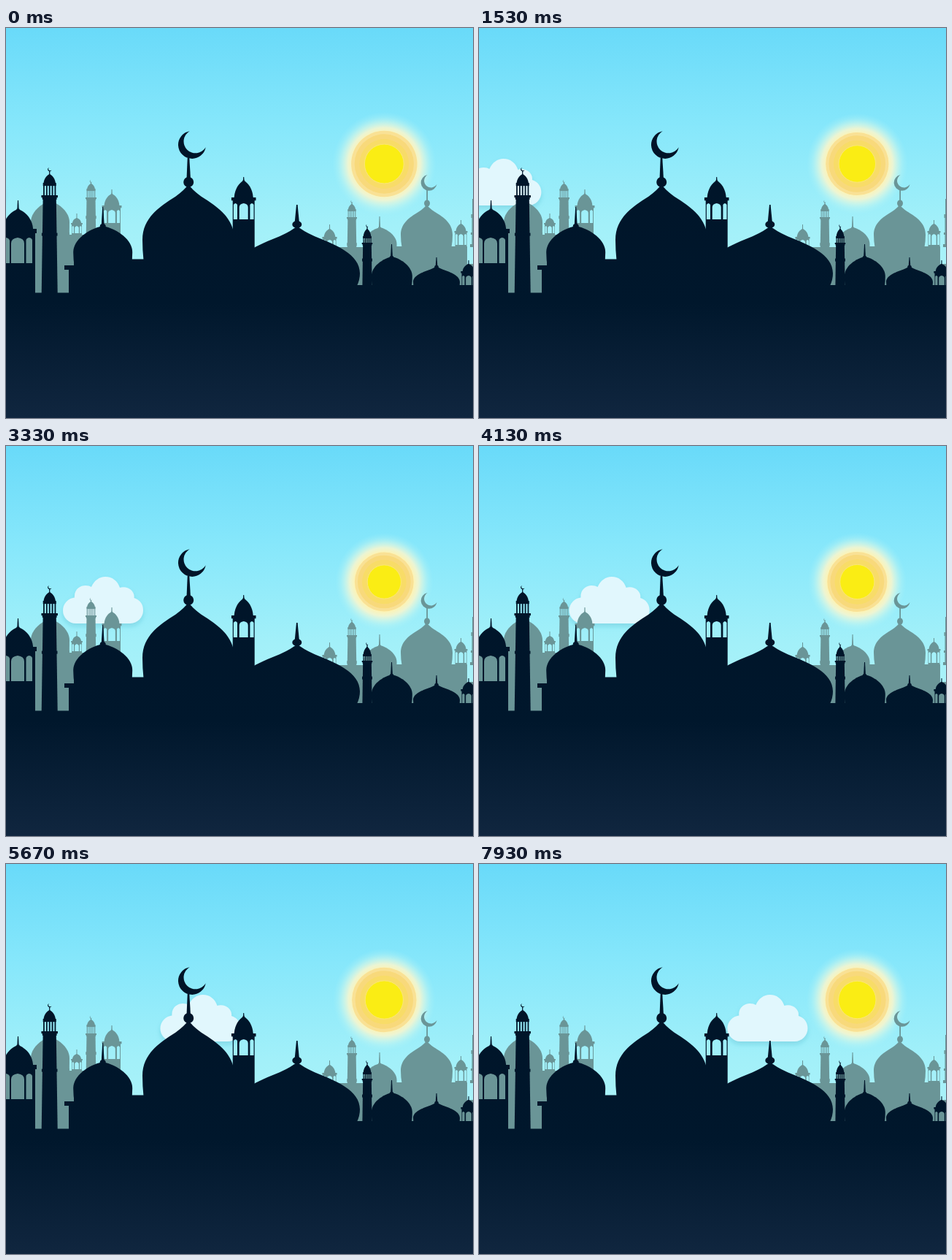
An HTML page for the animation above (8000 ms loop, 640 px wide and 534 px high).

```html
<!DOCTYPE html>
<html lang="en">
<head>
<meta charset="utf-8">
<title>City skyline</title>
<style>
  html, body { margin: 0; width: 100%; height: 100%; overflow: hidden; }
  svg { display: block; width: 100%; height: 100%; }
</style>
</head>
<body>
<svg viewBox="0 0 640 534" preserveAspectRatio="none">
  <defs>
    <linearGradient id="sky" x1="0" y1="0" x2="0" y2="1">
      <stop offset="0" stop-color="#69daf9"/>
      <stop offset=".25" stop-color="#86e7fb"/>
      <stop offset=".5" stop-color="#a2f0f9"/>
      <stop offset=".7" stop-color="#b0f4f9"/>
    </linearGradient>
    <linearGradient id="night" gradientUnits="userSpaceOnUse" x1="0" y1="140" x2="0" y2="534">
      <stop offset="0" stop-color="#001428"/>
      <stop offset=".6" stop-color="#00172c"/>
      <stop offset="1" stop-color="#10263f"/>
    </linearGradient>
    <radialGradient id="halo">
      <stop offset=".6" stop-color="#fdf3b4"/>
      <stop offset=".7" stop-color="#f6f6cf" stop-opacity=".9"/>
      <stop offset=".8" stop-color="#e0f8e2" stop-opacity=".6"/>
      <stop offset=".9" stop-color="#cbf7ee" stop-opacity=".25"/>
      <stop offset="1" stop-color="#b4f3f5" stop-opacity="0"/>
    </radialGradient>
    <filter id="soft" x="-20%" y="-20%" width="140%" height="150%">
      <feDropShadow dx="0" dy="4" stdDeviation="3" flood-color="#2a8fa8" flood-opacity=".22"/>
    </filter>
  </defs>
  <rect width="640" height="534" fill="url(#sky)"/>
  <g id="sun" transform="translate(518.3 186)">
    <circle fill="url(#halo)"/>
    <circle fill="#f9e195"/>
    <circle fill="#f8d97b"/>
    <circle fill="#f8dc68"/>
    <circle fill="#faed14" stroke="#fbe873" stroke-width="1"/>
  </g>
  <g id="cloud" filter="url(#soft)" fill="#e1f7fd">
    <path d="M18 243A18 18 0 0 1 0 225A18 18 0 0 1 16 207.500C15 196 24 191 31 191Q36 191 39 193C43 184 50 179 58 179C68 179 75 185 78 194C89 191 99 199 97.500 208C106 211 110 217 110 225C110 235 102 243 92 243Z"/>
  </g>
  <g id="far" fill="#6a9597"></g>
  <g id="near" fill="url(#night)"></g>
</svg>
<script>
const $ = id => document.getElementById(id);
const LOOP = 8000, PULSE = 6670;
let layer;

function add(d) {
  const p = document.createElementNS('http://www.w3.org/2000/svg', 'path');
  p.setAttribute('d', d);
  p.setAttribute('fill-rule', 'evenodd');
  layer.append(p);
}
const box = (l, t, r, b) => `M${l} ${t}H${r}V${b}H${l}Z`;
const rect = (...a) => add(box(...a));
const ball = (x, y, rx, ry = rx) =>
  add(`M${x - rx} ${y}a${rx} ${ry} 0 1 0 ${2 * rx} 0a${rx} ${ry} 0 1 0 ${-2 * rx} 0Z`);

// Half outlines from tip to widest point, as fractions of half width and height
const ROUND = 'C.5 .12 1 .53 1 1';
const ONION = 'Q.08 .1 .28 .22C.62 .4 1 .6 1 1';
const CAP = 'C.45 .12 .92 .45 1 1';

function dome(x, top, w, wide, base, foot, outline = ROUND) {
  const h = wide - top, low = (wide + base) / 2;
  for (const side of [-1, 1]) {
    const curve = outline.replace(/([\d.]+) ([\d.]+)/g,
      (_, a, b) => `${x + side * a * w} ${top + b * h} `);
    add(`M${x} ${top}${curve}Q${x + side * w} ${low} ${x + side * foot} ${base}H${x - side}V${top + 1}Z`);
  }
}

function spire(x, top, base, r) {
  add(`M${x - .5} ${top}h1L${x + r * .55} ${base}h${-r * 1.1}Z`);
  ball(x, base - r * .6, r, r * .9);
}

function crescent(x, y, r) {
  add(`M${x - .16 * r} ${y - r}A${r} ${r} 0 1 0 ${x + r} ${y + .16 * r}` +
    `A${.85 * r} ${.85 * r} 0 1 1 ${x - .16 * r} ${y - r}Z`);
}

function arch(l, r, top, base) {
  const m = (l + r) / 2, s = top + (r - l) * .45;
  return `M${l} ${base}V${s}Q${l} ${top + 1} ${m} ${top}Q${r} ${top + 1} ${r} ${s}V${base}Z`;
}

// Domed kiosk with one wide arch between two narrow ones
function kiosk(x, w, tip, top, eave, open, base, bottom) {
  spire(x, tip, top + 2, w * .12);
  dome(x, top, w * .87, eave, eave + 1, w * .87, CAP);
  rect(x - w * 1.12, eave, x + w * 1.12, eave + w * .28);
  const a = w * .92, b = w * .58, c = w * .4;
  add(box(x - w, eave + 1, x + w, base) + arch(x - a, x - b, open, base) +
    arch(x - c, x + c, open, base) + arch(x + b, x + a, open, base));
  rect(x - w, base, x + w, bottom);
}

function minaret(x, w, tip, top, gallery, deck, bottom, flare) {
  crescent(x, tip + w * .3, w * .3);
  rect(x - .6, tip + w * .5, x + .6, top + 1);
  dome(x, top, w * .92, gallery, gallery + 1, w * .92, CAP);
  rect(x - w, gallery - 1, x + w, gallery + w * .35);
  for (let i = -2; i <= 2; i++) rect(x + i * w * .43 - w * .1, gallery, x + i * w * .43 + w * .1, deck);
  rect(x - w * 1.25, deck, x + w * 1.25, deck + w * .35);
  rect(x - w * 1.1, deck, x + w * 1.1, deck + w * .65);
  const mid = deck + (bottom - deck) * .4;
  rect(x - w * 1.2, mid - 2, x + w * 1.2, mid + 2);
  add(`M${x - w} ${deck}H${x + w}L${x + w + flare} ${bottom}H${x - w - flare}Z`);
}

layer = $('far');
rect(0, 281, 36, 330);
dome(60.5, 237, 26.5, 266, 290, 26);
rect(35, 280, 87, 363);
rect(78, 283, 134, 335);
kiosk(97, 7, 254, 260, 267, 271, 281, 300);
minaret(116.500, 6, 208, 213, 221, 232, 300, 1);
kiosk(145, 12, 221, 227, 243, 249, 267, 320);
kiosk(443.500, 9, 269, 275, 286, 290, 300, 352);
rect(452, 300, 490, 355);
minaret(474, 5.600, 236, 241, 249, 259, 352, 1.500);
spire(512, 258, 275, 2);
dome(512.500, 273, 23, 296, 312, 22);
rect(487, 303, 545, 355);
crescent(579.500, 212, 11);
rect(576.200, 222, 578, 240);
ball(577, 240, 4, 4.500);
dome(576.500, 242, 35.500, 283, 300, 34, ONION);
rect(534, 299, 632, 354);
kiosk(623.500, 8, 263, 268, 278, 282, 297, 330);
rect(630, 323, 640, 355);
rect(639, 234, 640, 256);
rect(637.500, 255, 640, 260);
rect(638.500, 260, 640, 298);
rect(637, 280, 640, 283);
rect(636, 296, 640, 300);

layer = $('near');
rect(0, 362.500, 640, 534);
// Left kiosk
spire(16.500, 236, 251, 2.500);
dome(16.500, 248, 20.500, 274, 276, 20.500, CAP);
rect(0, 275, 42, 281);
add(box(0, 280, 40, 323) + arch(-5, 5, 287, 323) + arch(7, 25, 287, 323) + arch(27.500, 36, 287, 323));
rect(0, 322, 40, 364);

minaret(59.700, 9, 191, 200, 213, 229, 363, 2);
rect(80, 325, 100, 331);
rect(86, 330, 200, 364);
rect(93, 316.500, 400, 364);
spire(132.700, 245, 274, 4);
dome(132.700, 271, 40.500, 307, 326, 39);

// Main dome
crescent(254.700, 160.200, 19);
add('M248.700 178h2.600L253 207h-5.500Z');
ball(250.200, 211, 7, 7);
dome(250, 214, 63, 290, 318, 61.500, ONION);
kiosk(325.700, 15, 204, 209, 232, 240, 262, 364);

// Wide dome
add('M398 242h1.600L402.500 273h-7.500Z');
ball(398.800, 269, 6.500, 5);
dome(399, 271, 86, 336, 353, 82, ONION);
rect(330, 352, 640, 364);

minaret(495, 5.800, 269, 275, 286, 294, 353, .8);
spire(528.500, 296, 316, 2.800);
dome(528.800, 313, 28, 340, 354, 27);
spire(590, 314, 329, 2.800);
dome(590, 326, 32, 348, 355, 31, ONION);
rect(556, 354, 640, 364);
kiosk(634, 9.500, 318, 323, 333, 339, 354, 364);

const rings = [...$('sun').children];
function draw(now) {
  const t = now % LOOP;
  const wave = Math.cos(t / PULSE * 2 * Math.PI);
  const outer = 42.800 + 2.400 * wave;
  [69 + 2 * wave, outer, outer * .9, outer * .75, 25 + 1.9 * wave]
    .forEach((r, i) => rings[i].setAttribute('r', r));
  $('cloud').setAttribute('transform', `translate(${-112 + .05704 * t} 0)`);
  requestAnimationFrame(draw);
}
draw(0);
</script>
</body>
</html>
```
